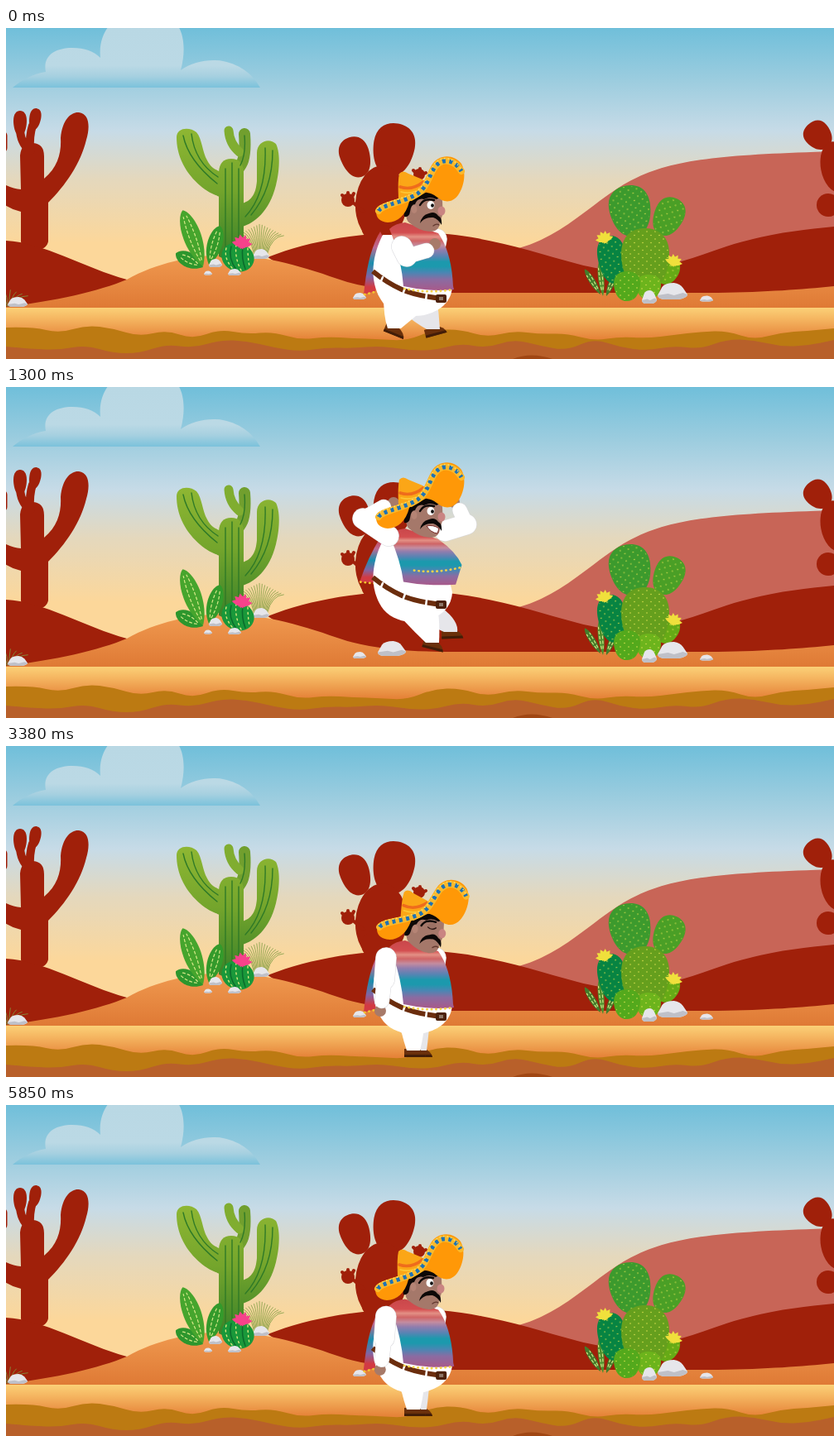
These frames come from a looping animation (1000x400 px, 5.98 s). An HTML page:

```html
<!DOCTYPE html>
<html lang="en">
<head>
<meta charset="utf-8">
<title>Desert walk</title>
<style>
html, body { margin: 0; width: 100%; height: 100%; overflow: hidden; background: #fbd79b; }
svg { display: block; width: 100%; height: 100%; }
text { font: 700 28px "Open Sans", "Noto Sans", sans-serif; fill: #fff; }
</style>
</head>
<body>
<svg viewBox="0 0 1000 400">
  <defs id="defs"></defs>
  <g id="scene"></g>
  <g id="man"></g>
</svg>
<script>
const $ = id => document.getElementById(id);
const shape = (d, fill, extra = '') => `<path d="${d}" fill="${fill}" ${extra}/>`;
const line = (d, color, w, extra = '') =>
  `<path d="${d}" fill="none" stroke="${color}" stroke-width="${w}" stroke-linecap="round" stroke-linejoin="round" ${extra}/>`;
const oval = (x, y, rx, ry, fill, rot = 0) =>
  `<ellipse cx="${x}" cy="${y}" rx="${rx}" ry="${ry}" fill="${fill}" transform="rotate(${rot} ${x} ${y})"/>`;
// Lobe with a broad top and a narrow foot.
const egg = (x, y, rx, ry, fill, rot = 0) =>
  shape(`M0,${ry} C${-rx * .8},${ry} ${-rx},${ry * .2} ${-rx},${-ry * .2} C${-rx},${-ry * .75} ${-rx * .55},${-ry} 0,${-ry} C${rx * .55},${-ry} ${rx},${-ry * .75} ${rx},${-ry * .2} C${rx},${ry * .2} ${rx * .8},${ry} 0,${ry}Z`,
    fill, `transform="translate(${x} ${y}) rotate(${rot})"`);
const marks = stops => stops.map(([o, c]) => `<stop offset="${o}" stop-color="${c}"/>`).join('');
const fade = (id, y1, y2, stops) =>
  `<linearGradient id="${id}" gradientUnits="userSpaceOnUse" x1="0" x2="0" y1="${y1}" y2="${y2}">${marks(stops)}</linearGradient>`;

$('defs').innerHTML =
  fade('sky', 0, 260, [[0, '#70bfda'], [.25, '#9dcddf'], [.48, '#c7dbe7'], [.7, '#e4d8bd'], [1, '#fcd79a']]) +
  fade('cloud', 0, 73, [[0, '#b9d8e4'], [.62, '#bbd9e5'], [.8, '#a6d0e0'], [1, '#78c1db']]) +
  fade('ground', 273, 338, [[0, '#f09a50'], [1, '#df7a35']]) +
  fade('road', 338, 376, [[0, '#fbd077'], [.35, '#f5b661'], [1, '#e58238']]) +
  fade('tall', 120, 270, [[0, '#8fb733'], [.5, '#74a52c'], [1, '#3f8429']]) +
  `<linearGradient id="wool" x1="0" x2="0" y1="0" y2="1">${marks([
    [0, '#c9474b'], [.15, '#d34e50'], [.21, '#e39085'], [.27, '#cf6566'], [.34, '#c48c9f'],
    [.41, '#8f7dae'], [.5, '#5784b3'], [.58, '#1c99ad'], [.65, '#1c99ad'], [.74, '#4a86b3'], [.84, '#8a6ca2'], [1, '#a8598a']])}</linearGradient>
  <linearGradient id="tail" x1="0" x2="0" y1="0" y2="1">${marks([
    [0, '#cc4347'], [.25, '#bd6a94'], [.5, '#198fae'], [.72, '#8264a2'], [.88, '#d23a43'], [1, '#d23a43']])}</linearGradient>
  <pattern id="dots" width="10" height="9" patternUnits="userSpaceOnUse">
    <circle cx="2" cy="2" r=".8" fill="#d3dc4c"/><circle cx="7" cy="6.5" r=".8" fill="#d3dc4c"/></pattern>`;

/* ---------- scenery ---------- */

// Soft edge through evenly spaced heights, closed at the bottom.
function layer(ys, fill) {
  const w = 1000 / (ys.length - 1);
  let d = `M0,400 V${ys[0]}`;
  for (let i = 1; i < ys.length - 1; i++)
    d += ` Q${i * w},${ys[i]} ${(i + .5) * w},${(ys[i] + ys[i + 1]) / 2}`;
  return shape(d + ` L1000,${ys[ys.length - 1]} V400 Z`, fill);
}

const stone = (x, y, w, h) => `<g transform="translate(${x} ${y}) scale(${w} ${h})">` +
  shape('M-1,.5 L-.7,-.5 Q-.5,-1 .1,-1 Q.5,-.9 .7,-.4 L1,.4 Q1,.8 .4,1 H-.6 Q-1,.9 -1,.5Z', '#e6e6eb') +
  shape('M-1,.5 L-.3,.3 L.1,.5 L.7,.2 L1,.4 Q1,.8 .4,1 H-.6 Q-1,.9 -1,.5Z', '#bfc0c8') + '</g>';

const pad = (x, y, rx, ry, rot, fill) => egg(x, y, rx, ry, fill, rot) + egg(x, y, rx - 1, ry - 1, 'url(#dots)', rot);

function bloom(x, y, fill, size, lean) {
  let s = '';
  for (let a = -80; a <= 80; a += 32)
    s += `<path d="M0,5 Q-6,-3 0,-11 Q6,-3 0,5Z" fill="${fill}" transform="translate(${x} ${y}) rotate(${a + lean}) scale(${size})"/>`;
  return s;
}

function blade(x, y, h, rot, fill, w = 7) {
  return `<g transform="translate(${x} ${y}) rotate(${rot})">` +
    shape(`M0,0 C${-w * 1.4},${-h * .35} ${-w},${-h * .9} 0,${-h} C${w},${-h * .9} ${w * 1.4},${-h * .35} 0,0Z`, fill) +
    line(`M-1,-8 Q${-w * .5},${-h * .5} -2,${8 - h} M1,-8 Q${w * .5},${-h * .5} 2,${8 - h}`, '#d5e887', 1.2, 'stroke-dasharray="3 3"') + '</g>';
}

function grass(x, y, n, h) {
  let s = '';
  for (let i = 0; i < n; i++) {
    const a = (i / (n - 1) - .45) * 2;
    s += `M${x + i - n / 2},${y} q${a * 5},${-h * .6} ${a * 18},${-h * (1 - Math.abs(a) * .35)}`;
  }
  return line(s, '#7f9d45', .8);
}

function scenery() {
  const red = '#a0200a', ridge = '#2f7a27';
  let s = `<rect width="1000" height="400" fill="url(#sky)"/>`;
  s += shape('M8,72 C18,64 30,56 48,53 C44,33 60,24 80,24 C95,24 106,28 114,36 C112,16 119,4 126,-5 H206 C214,5 218,25 211,51 C225,41 245,37 262,40 C286,45 299,58 307,72Z', 'url(#cloud)');
  s += shape('M600,270 C655,262 690,228 728,201 C786,159 845,154 1000,149 V320 H600Z', '#c86557');

  // far cactus shadows
  s += shape('M17,154 Q18,139 33,139 Q46,140 46,155 L46,182 C63,168 67,150 66,133 C68,109 80,101 88,102 C102,104 101,122 97,135 C90,164 72,190 51,211 V258 Q49,268 36,268 Q19,270 18,258 V222 Q5,219 -4,212 V188 Q8,194 18,195Z', red);
  s += egg(35, 110, 7, 13, red, 10) + egg(17, 115, 8, 15, red) + line('M32,118 Q28,130 29,148 M17,125 Q19,142 30,148', red, 10) + line('M-4,130 V145', red, 11);
  s += egg(468, 147, 25, 32, red, 10) + egg(422, 156, 18, 25, red, -18) + oval(453, 212, 31, 46, red, 4) + oval(446, 240, 17, 17, red);
  s += oval(413, 208, 8, 8, red) + line('M406,202 l4,4 M413,199 v4 M420,200 l-2,4 M418,210 L432,222', red, 4);
  s += oval(499, 177, 7, 7, red) + line('M492,172 l4,4 M500,170 v4 M507,175 l-4,2 M498,178 L484,192', red, 4);
  s += egg(981, 130, 16, 18, red, -40) + oval(1002, 168, 18, 31, red, -10) + oval(993, 214, 14, 14, red);

  // near hills and ground
  s += shape('M0,257 C45,259 95,290 146,304 L120,340 H0Z', red);
  s += shape('M316,277 C370,256 430,247 490,247 C570,247 630,269 690,285 C760,304 810,285 870,264 C920,248 960,244 1000,240 V330 H400Z', red);
  s += shape('M0,337 C60,330 112,318 146,304 C185,282 230,275 262,274 C300,273 350,285 400,303 C440,317 490,320 540,320 H860 C920,319 960,316 1000,312 V340 H0Z', 'url(#ground)');
  s += '<rect y="338" width="1000" height="62" fill="url(#road)"/>';
  s += layer([362, 361, 369, 359, 363, 373, 365, 376, 364, 370, 367, 377, 373, 375, 376, 378, 365, 364, 374, 366, 370, 369, 378, 373, 375, 371, 367, 366, 377, 368, 366, 363], '#bc7a12');
  s += layer([385, 388, 389, 383, 393, 393, 382, 387, 377, 378, 386, 391, 386, 387, 384, 389, 390, 381, 387, 376, 384, 390, 375, 386, 390, 384, 388, 376, 377, 385, 384, 377], '#b8602a');
  s += shape('M612,400 Q634,391 660,400Z', '#a04714');

  // tall cactus
  s += grass(308, 273, 17, 36);
  s += shape('M206,132 C206,120 222,119 230,126 C237,134 237,150 243,160 C248,170 254,171 259,174 V204 C240,199 222,181 214,165 C208,153 206,142 206,132Z', 'url(#tall)');
  s += shape('M303,151 C303,137 318,132 326,140 C332,152 330,175 326,190 C318,222 300,236 285,240 V212 C300,208 302,195 303,185Z', 'url(#tall)');
  s += line('M288,128 Q290,155 284,165 Q279,172 274,182', '#719f2e', 14) + line('M269,124 Q270,140 282,150', '#80ad30', 11);
  s += shape('M257,276 V174 Q258,158 272,158 Q286,158 287,174 V276 Q272,284 257,276Z', 'url(#tall)');
  s += line('M265,170 V272 M273,163 V277 M281,170 V272 M214,130 Q220,160 255,188 M224,128 Q228,162 256,180 M313,145 Q315,200 289,228 M322,148 Q322,195 296,226 M288,130 Q290,152 283,166', ridge, 1.4);

  // aloe and small cactus
  s += blade(238, 289, 37, -63, '#2d962d', 10) + blade(245, 286, 49, 16, '#339a2b', 10) + blade(238, 288, 72, -20, '#46a52d', 12);
  s += stone(308, 273, 10, 6) + stone(253, 284, 8, 5);
  s += oval(280, 277, 20, 17, '#19983a', 20) + line('M266,266 Q263,278 273,290 M278,262 Q276,278 284,293 M292,266 Q292,278 294,288', '#d8e77b', 1.4, 'stroke-dasharray="2 4"');
  s += line('M272,264 Q268,278 278,292 M286,264 Q284,278 289,291', '#0b6b2c', 1.5);
  s += bloom(285, 262, '#f6428b', 1.15, 5);
  s += stone(276, 295, 8, 4) + stone(244, 296, 5, 2.5);
  s += grass(4, 336, 7, 20) + stone(14, 331, 12, 6);
  s += stone(466, 316, 17, 9) + stone(427, 324, 8, 4);

  // prickly pear
  s += blade(721, 324, 42, -6, '#4d8f2d', 4) + blade(718, 322, 36, -32, '#427d2b', 4) + blade(725, 324, 32, 22, '#427d2b', 4);
  s += pad(754, 221, 25, 31, -10, '#3c9a2d') + pad(800, 228, 18, 24, 25, '#4a9f26');
  s += pad(732, 280, 17, 29, -8, '#078442') + pad(798, 293, 15, 17, 20, '#66aa16');
  s += pad(772, 280, 29, 38, 0, '#659f1d') + pad(776, 313, 15, 15, 0, '#6cb41c') + pad(750, 312, 16, 18, 0, '#53a91c');
  s += bloom(723, 256, '#f0e03c', 1, -12) + bloom(806, 284, '#f0e03c', 1, 15);
  s += stone(777, 325, 9, 8) + stone(805, 318, 18, 10) + stone(846, 327, 8, 3.5);
  return s;
}

/* ---------- the walker ---------- */

// Arms: shoulder, elbow, wrist, hand. Legs: ankle x, y, foot angle, knee push.
const nearArm = [
  [478, 264, 484, 276, 508, 269, 518, 261], [467, 259, 466, 279, 488, 284, 498, 282],
  [452, 254, 448, 272, 462, 283, 469, 287], [448, 250, 444, 269, 454, 280, 460, 285],
  [446, 250, 440, 269, 449, 282, 454, 287], [457, 256, 455, 276, 472, 284, 481, 286]];
const farArm = [
  [520, 255, 515, 280, 512, 290, 510, 292], [524, 255, 533, 272, 545, 272, 553, 270],
  [525, 256, 538, 272, 550, 268, 561, 264], [525, 254, 539, 271, 554, 262, 565, 256],
  [525, 254, 539, 269, 555, 260, 566, 254], [524, 255, 532, 272, 542, 271, 551, 269]];
const stride = [[469, 363, 22, 0], [488, 354, 28, 8], [514, 361, 18, 6], [516, 364, -15, 0], [497, 366, 0, 0], [476, 365, 8, 0]];

const mix = (a, b, k) => a.map((v, i) => v + (b[i] - v) * k);
const base = { dy: 0, flare: 0, head: [0, 0, 0], mood: 'calm', swell: 0, z: null };

const walk = p => ({ ...base, near: nearArm[p], far: farArm[p], legN: stride[p], legF: stride[(p + 3) % 6] });

function jump(k) {
  const w = walk(0), m = [.4, 1, 1, 1, 1, .6][k], s = [0, 0, 14, 20, 10, 0][k];
  return {
    ...base, mood: 'scared', dy: [-6, -30, -52, -63, -64, -32][k], flare: [.3, 1, 1.2, 1, .7, .4][k],
    near: mix(w.near, [462, 244, 441 - s, 223, 461 - s / 2, 209, 468, 204], m),
    far: mix(w.far, [530, 238, 541 + s * 1.5, 230, 543 + s / 2, 213, 541, 203], m),
    legN: mix(w.legN, [515, 373, 14, 2], m), legF: mix(w.legF, [537, 360, -2, 14], m)
  };
}

function rest(i) {
  const k = i - 26, awake = i >= 43, nod = Math.sin(k / 9 * 2 * Math.PI);
  const half = i === 42 ? .5 : 1;
  let z = null;
  if (k > 0 && k < 13) {
    const n = (k - 1) % 4, rise = [26, 23, 16][k - 1 >> 2];
    z = [531 + n * 1.5, 222 - n * rise];
  }
  return {
    ...base, z, swell: nod, mood: awake ? 'calm' : 'asleep',
    head: awake ? [-1, 1, 0] : [half, 3 * half, (6 + nod * .6) * half],
    near: [459, 256, 457, 282, 454, 308, 452, 320], far: [519, 256, 515, 280, 512, 292, 510, 295],
    legN: [492, 368, 0, 2], legF: [500, 368, 0, 0]
  };
}

const pose = i => i >= 26 ? rest(i) : i >= 6 && i < 12 ? jump(i - 6) : walk(i % 6);

function arm([sx, sy, ex, ey, wx, wy, hx, hy]) {
  const upper = `M${sx},${sy} L${ex},${ey}`, lower = `M${ex},${ey} L${wx},${wy}`;
  return oval(hx, hy, 7, 7, '#a77a69') + line(lower, '#d6d6da', 18.5) +
    line(upper, '#d6d6da', 25.5) + line(upper, '#fff', 24.5) + line(lower, '#fff', 17.5);
}

function leg([x, y, r, k], fill) {
  const open = Math.min(1, Math.abs(x - 490) / 20), l = 474 - 18 * open, rt = 504 + 16 * open;
  return `<g transform="translate(${x} ${y}) rotate(${r})">` +
    shape('M-11,-2 L4,-3 Q14,1 15,8 H-11Z', '#6a300b') + shape('M-11,5 H14 L15,8 H-11Z', '#421d08') + '</g>' +
    shape(`M${l},318 Q${(l + x) / 2 - 7 + k},348 ${x - 8},${y} L${x + 8},${y} Q${(x + rt) / 2 + 5 + k},345 ${rt},326Z`, fill);
}

function poncho(f) {
  return shape(`M463,243 Q470,236 482,235 L522,248 Q${538 + 8 * f},${270 - 10 * f} ${540 + 15 * f},${312 - 47 * f} L${541 + 3 * f},${316 - 19 * f} Q510,${319 - 20 * f} 480,${312 - 18 * f} Q477,275 463,243Z`, 'url(#wool)') +
    line(`M${481 + 17 * f},${315 - 42 * f} Q${510 + 15 * f},${321 - 45 * f} ${540 + 15 * f},${316 - 49 * f}`, '#f3d24a', 2.6, 'stroke-dasharray=".5 5"');
}

function face(mood) {
  const skin = '#a5786a';
  let s = shape('M484,205 Q480,232 488,236 Q500,246 514,246 Q523,245 524,236 L527,226 Q528,212 526,203 L500,196Z', skin);
  s += shape('M481,228 Q478,210 488,203 Q505,194 530,197 L534,206 Q525,203 520,207 Q512,203 505,207 Q497,205 494,213 Q489,213 488,222 Q487,229 481,228Z', '#0d0807');
  s += oval(493, 219, 3.5, 5, '#b58475') + oval(526, 221, 4.5, 5.5, '#c98482');
  if (mood === 'asleep') {
    s += oval(513, 214, 5, 5, '#9c7164') + line('M508,215 Q513,219 518,215', '#2b1713', 1.3);
  } else {
    s += oval(513, 214, 4.5, 5, '#fff') + oval(515, 214.5, 1.9, 2.2, '#111');
  }
  s += line('M500,214 Q505,205 517,208', '#0d0807', 2.4);
  if (mood === 'scared') s += shape('M508,232 Q516,230 523,235 L521,241 Q513,240 508,232Z', '#fff', 'stroke="#7b2d2b"');
  else s += line('M516,239 Q520,236 523,238', '#63392f', 1.3);
  return s + shape('M500,236 Q502,226 511,224 Q518,221 522,227 Q527,229 526,238 Q522,231 516,229 Q506,228 500,236Z', '#0d0807');
}

function hat() {
  const rim = 'M450,221 C454,214 474,212 492,203 C509,195 510,179 518,168 C526,157 541,158 550,173';
  return shape('M474,206 Q473,184 475,176 Q479,171 486,176 L503,183 Q510,186 508,198 L490,209Z', '#fba617') +
    line('M476,192 Q490,197 504,186', '#ef6c1c', 3.5) + line('M477,198 Q492,202 505,192', '#fcc736', 1.6) +
    shape('M447,222 C446,212 470,209 490,200 C506,193 507,178 514,166 C522,152 541,152 550,164 C557,176 552,194 546,202 C539,212 528,211 520,204 C509,195 493,198 487,210 C483,226 473,235 461,235 C451,234 447,229 447,222Z', '#ff9807') +
    line(rim, '#fbb92c', 8) + line(rim, '#1e72b5', 5, 'stroke-dasharray="4 4.5" style="stroke-linecap:butt"') +
    line(rim, '#ffe06a', 1.6, 'stroke-dasharray=".1 4.5" transform="translate(-1 -3)"');
}

function man(p) {
  const f = p.flare, [hx, hy, hr] = p.head, grow = 1 + p.swell * .008;
  const body =
    shape(`M452,246 Q437,270 ${432 - 7 * f},${322 - 32 * f} L446,${318 - 25 * f} L460,262Z`, 'url(#tail)') +
    line(`M${433 - 7 * f},${322 - 32 * f} L445,${319 - 25 * f}`, '#f3c530', 2.6, 'stroke-dasharray=".5 5"') +
    shape('M455,250 C442,275 437,308 456,333 C468,347 488,350 505,347 C525,342 538,331 539,312 L524,250Z', '#fff') +
    line('M443,294 Q460,308 478,316 T528,327', '#6b2d0d', 6, 'style="stroke-linecap:butt"') +
    line('M455,301 l-3,7 M482,314 l-3,8 M508,321 l-1,8', '#fff', 2.5) +
    '<rect x="519" y="322" width="13" height="10" rx="2" fill="#4c210b"/><rect x="523" y="325" width="5" height="4" fill="#8e7668"/>' +
    poncho(f) + arm(p.near);
  return `<g transform="translate(0 ${p.dy})">` +
    arm(p.far) + leg(p.legF, '#e6e6ea') + leg(p.legN, '#fff') +
    `<g transform="translate(495 348) scale(${grow}) translate(-495 -348)">${body}</g>` +
    `<g transform="translate(${hx} ${hy}) rotate(${hr} 500 220)">${face(p.mood)}${hat()}</g></g>` +
    (p.z ? `<text x="${p.z[0]}" y="${p.z[1]}">Z</text>` : '');
}

/* ---------- clock ---------- */

const STEP = 130, LOOP = 5980;
let shown = -1;

function tick() {
  const i = Math.floor(performance.now() % LOOP / STEP);
  if (i !== shown) {
    $('man').innerHTML = man(pose(i));
    shown = i;
  }
  requestAnimationFrame(tick);
}

$('scene').innerHTML = scenery();
tick();
</script>
</body>
</html>
```
